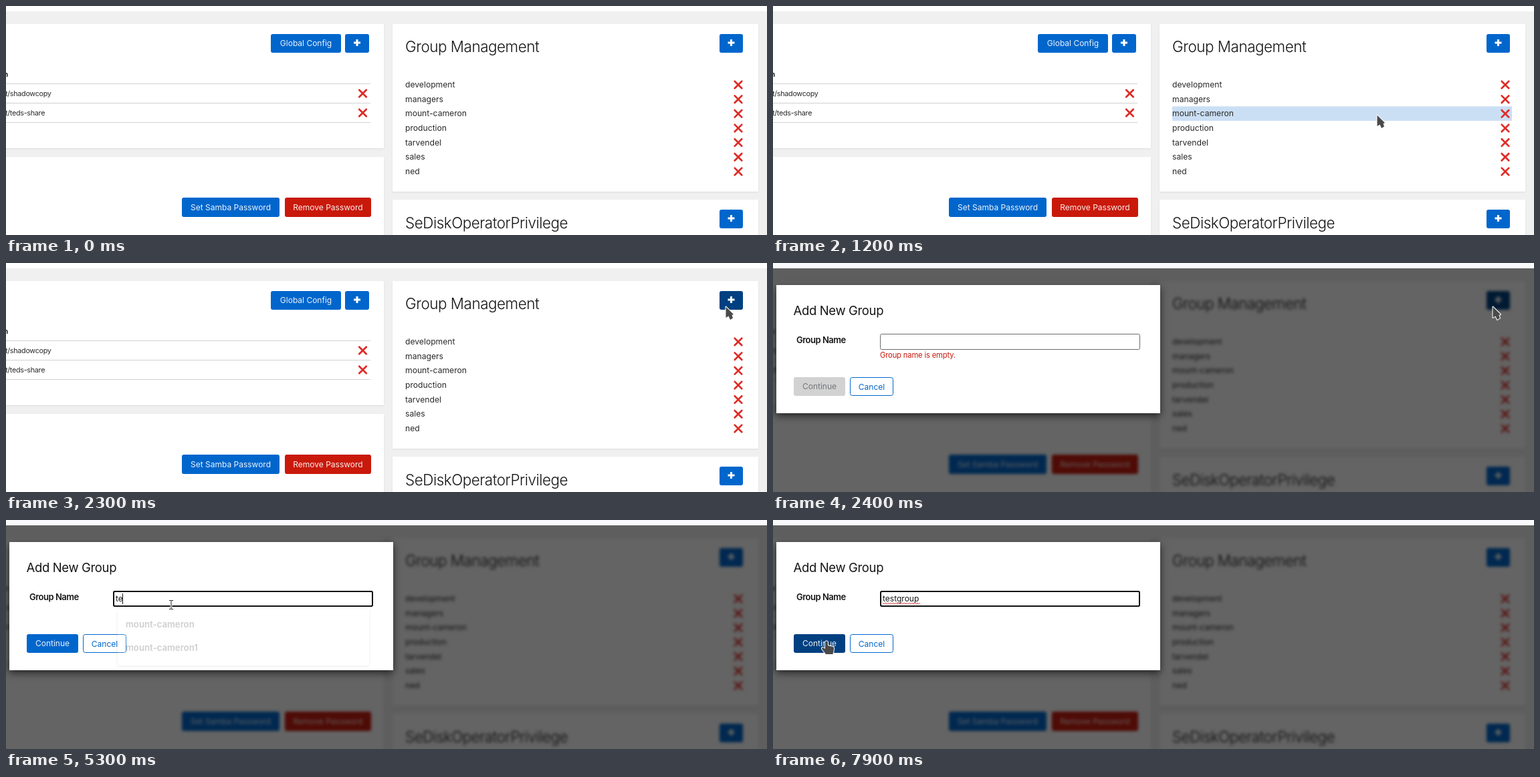
Write an HTML page that moves like this. It is 1138 by 343 pixels and loops after 8000 ms.

```html
<!DOCTYPE html>
<html lang="en">
<head>
<meta charset="utf-8">
<title>Add a group</title>
<style>
html, body { margin: 0; width: 1138px; height: 343px; overflow: hidden; background: #fff; }
svg { display: block; font: 12px Inter, "Open Sans", sans-serif; font-optical-sizing: none; fill: #151515; }
.card { fill: #fff; filter: drop-shadow(0 1px 1px rgba(3,3,3,.08)); }
.title { font-size: 22.4px; font-weight: 300; letter-spacing: -.45px; }
.path { font-size: 10.8px; letter-spacing: -.3px; fill: #2a2a2a; }
.list { font-size: 12.15px; fill: #2a2a2a; }
.label { text-anchor: middle; }
.cross { stroke: #de2c26; stroke-width: 2.7; stroke-linecap: round; }
.plus { stroke: #fff; stroke-width: 3; }
.blurred { filter: blur(2.2px); }
#box { fill: #fff; filter: drop-shadow(0 4px 6px rgba(3,3,3,.65)); }
#panel { fill: #fff; filter: drop-shadow(0 1px 2px rgba(3,3,3,.4)); }
#menu text { font-size: 13.2px; font-weight: 600; fill: #222; }
#error { font-size: 11.2px; letter-spacing: -.15px; fill: #c9190b; }
.pointer { fill: #4a4a4a; stroke: #fff; stroke-width: 2; stroke-linejoin: round; paint-order: stroke; }
</style>
</head>
<body>
<svg id="stage" width="1138" height="343" viewBox="0 0 1138 343"></svg>
<script>
const BLUE = '#06c', DARK = '#004080', RED = '#c9190b';
const rect = (x, y, w, h, attrs = '') => `<rect x="${x}" y="${y}" width="${w}" height="${h}" ${attrs}/>`;
const text = (x, y, s, attrs = '') => `<text x="${x}" y="${y}" ${attrs}>${s}</text>`;
const card = (x, y, w, h) => rect(x, y, w, h, 'class="card"');
const cross = (x, y) => `<path class="cross" d="M${x - 5.3} ${y - 5.3}l10.6 10.6m0-10.6l-10.6 10.6"/>`;
const button = (x, y, w, h, label, fill = BLUE, id = '') =>
  `<g id="${id}">${rect(x, y, w, h, `rx="3" fill="${fill}"`)}` + (label === '+'
    ? `<path class="plus" d="M${x + w / 2 - 5} ${y + 13}h10m-5-5v10"/>`
    : text(x + w / 2, y + h / 2 + 4.2, label, 'class="label" fill="#fff" fill-opacity=".92"')) + '</g>';
const addButton = (y, id) => button(1067, y, 35, 28, '+', BLUE, id);

const groups = ['development', 'managers', 'mount-cameron', 'production', 'tarvendel', 'sales', 'ned'];
const shares = ['t/shadowcopy', 't/teds-share'];
const ROW = 21.65, LIST_TOP = 107;

const page = rect(-20, -20, 1180, 400, 'fill="#f0f0f0"') +
  card(-20, 27, 585, 186) + card(-20, 226, 585, 140) +
  card(578, 27, 547, 251) + card(578, 290, 547, 80) +
  button(396, 42, 105, 28, 'Global Config') +
  button(507, 42, 36, 28, '+') +
  text(3, 106, 'n', 'class="path" font-weight="700" text-anchor="end"') +
  rect(-20, 116, 565, 1, 'fill="#d2d2d2"') +
  shares.map((s, i) => text(-1, 135 + i * 29, s, 'class="path"') + cross(533.5, 131 + i * 29) +
    rect(-20, 145 + i * 29, 565, 1, 'fill="#d2d2d2"')).join('') +
  button(263, 287, 146, 29, 'Set Samba Password') +
  button(417, 287, 129, 29, 'Remove Password', RED) +
  text(597, 68.5, 'Group Management', 'class="title"') + addButton(42, 'add') +
  rect(597, 0, 508, ROW, 'id="hover" fill="#cbdff4"') +
  groups.map((g, i) => text(597, 122 + i * ROW, g, 'class="list"') + cross(1095, 118 + i * ROW)).join('') +
  text(597, 332.5, 'SeDiskOperatorPrivilege', 'class="title"') + addButton(305);

const dialog = rect(0, 8, 1138, 335, 'fill="#030303" fill-opacity=".61"') +
  rect(5, 33, 574, 192, 'id="box"') +
  text(30.5, 78, 'Add New Group', 'font-size="18.5" letter-spacing="-.35"') +
  text(35, 120, 'Group Name', 'font-size="13" font-weight="600" letter-spacing="-.5"') +
  rect(160.5, 106.5, 388, 23, 'rx="2" fill="#fff" stroke="#6b6b6b"') +
  rect(161, 107, 387, 22, 'id="focus" rx="2" fill="none" stroke="#101010" stroke-width="2"') +
  text(164, 122, '', 'id="typed"') +
  `<path id="squiggle" fill="none" stroke="#e04848" d="M164 124${'l2 2l2-2'.repeat(14)}"/>` +
  rect(174, 110, 1, 16, 'id="caret"') +
  text(160, 142, 'Group name is empty.', 'id="error"') +
  button(31, 171, 77, 28, 'Continue', BLUE, 'continue') +
  rect(115.5, 171.5, 64, 27, `rx="3" fill="#fff" stroke="${BLUE}"`) +
  text(147.5, 189.5, 'Cancel', `class="label" fill="${BLUE}"`) +
  `<g id="menu">${rect(167, 134, 376, 84, 'id="panel" rx="2"')}` +
  text(179, 161, 'mount-cameron') + text(179, 195.5, 'mount-cameron1') + '</g>';

const cursors = {
  arrow: '<path class="pointer" d="M.5 .5V17L4.5 14.5L7 20L11 17.5L9.5 13L12 12Z"/>',
  hand: '<path class="pointer" d="M-2 1.5Q0-1 2 1.5V7L10 9Q11.5 10 11 13L9.5 20H-1L-7 12Q-7.5 9.5-5 10L-2 12Z"/>',
  beam: ['#fff" stroke-width="3', '#222'].map(s =>
    `<path fill="none" stroke="${s}" d="M-3-6.5h2.5L0-6L.5-6.5H3M0-6V6M-3 6.5h2.5L0 6L.5 6.5H3"/>`).join('')
};

const stage = document.getElementById('stage');
stage.innerHTML = `<g id="page">${page}</g>${rect(0, 0, 1138, 8, 'id="strip"')}` +
  `<g id="dialog">${dialog}</g><g id="cursor"></g>`;
const el = Object.fromEntries([...stage.querySelectorAll('[id]')].map(e => [e.id, e]));

const entry = { x: 405, y: 318 };
const moves = [
  { from: 600, to: 1200, x: 903, y: 163 },
  { from: 1200, to: 1900, x: 1076, y: 65 },
  { from: 2900, to: 3600, x: 247, y: 130, sag: 45 },
  { from: 4100, to: 4200, x: 247, y: 127 },
  { from: 7500, to: 7900, x: 80, y: 181 }
];
const keyTimes = [5000, 5200, 5600, 5800, 6300, 6400, 6600, 6700, 6800];

const ramp = (t, a, b) => Math.min(1, Math.max(0, (t - a) / (b - a)));

// Every move starts fast and settles; sag bows its path downwards
function pointerAt(t) {
  let { x, y } = entry;
  for (const m of moves) {
    const p = ramp(t, m.from, m.to), e = Math.sin(p * Math.PI / 2);
    x += (m.x - x) * e;
    y += (m.y - y) * e + (m.sag || 0) * Math.sin(p * Math.PI);
  }
  return { x, y };
}

const show = (e, on) => e.style.display = on ? '' : 'none';
const paint = (group, fill) => group.firstChild.setAttribute('fill', fill);

function cursorKind(t) {
  if (t >= 7700 || (t >= 1900 && t < 2300)) return 'hand';
  return t >= 3500 && t < 7600 ? 'beam' : 'arrow';
}

function draw(t) {
  const open = t >= 2400, focused = t >= 4200;
  el.page.setAttribute('class', open ? 'blurred' : '');
  el.strip.setAttribute('fill', open ? '#fafafc' : '#fff');
  show(el.dialog, open);
  paint(el.add, t >= 1900 && t < 3800 ? DARK : BLUE);

  // Hover trails the pointer by one step
  const trail = pointerAt(t - 100);
  const row = Math.floor((trail.y - LIST_TOP) / ROW);
  show(el.hover, !open && trail.x > 597 && row >= 0 && row < groups.length);
  el.hover.setAttribute('y', LIST_TOP + row * ROW);

  const count = keyTimes.filter(k => k <= t).length;
  el.typed.textContent = 'testgroup'.slice(0, count);
  const width = count ? el.typed.getComputedTextLength() : 0;
  el.caret.setAttribute('x', 164 + Math.round(width - .6));
  show(el.caret, focused && t < 7400);
  show(el.focus, focused);
  show(el.squiggle, t >= 7600);
  show(el.error, !count);
  paint(el.continue, !count ? '#d2d2d2' : t >= 7800 ? DARK : BLUE);
  el.continue.lastChild.setAttribute('fill', count ? '#fff' : '#6a6e73');
  const alpha = ramp(t, 4200, 4400) * (1 - ramp(t, 5000, 5380));
  el.menu.setAttribute('opacity', alpha);
  show(el.menu, alpha > 0);

  show(el.cursor, t >= 600);
  const { x, y } = pointerAt(t);
  el.cursor.innerHTML = cursors[cursorKind(t)];
  el.cursor.setAttribute('transform', `translate(${x} ${y})`);
}

const start = performance.now();
function tick() {
  // The scene advances in tenths of a second
  draw(Math.floor((performance.now() - start) % 8000 / 100) * 100);
  requestAnimationFrame(tick);
}
tick();
</script>
</body>
</html>
```
